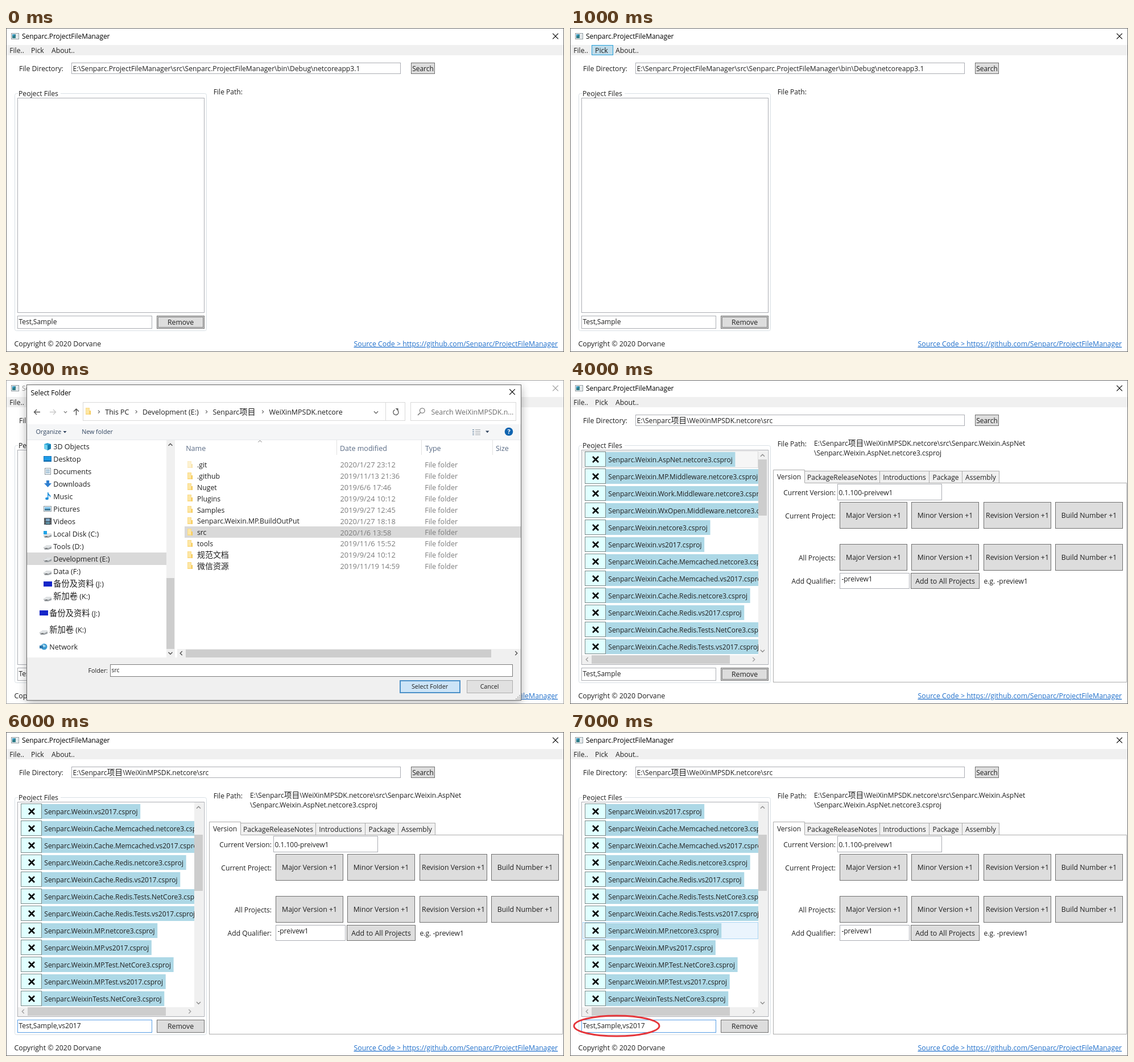
An HTML page that plays this animation: 981x571 px, repeating every 8000 ms.

```html
<!DOCTYPE html>
<html lang="en">
<head>
<meta charset="utf-8">
<title>File manager demo</title>
<style>
html, body { margin: 0; width: 100%; height: 100%; overflow: hidden; background: #fff; }
svg { display: block; width: 100vw; height: 100vh; font-family: "Open Sans", "Noto Sans CJK SC", "Noto Sans CJK", "Noto Sans", sans-serif; }
</style>
</head>
<body>
<svg id="stage" viewBox="0 0 981 571"></svg>
<script>
const stage = document.getElementById('stage');
const raw = String.raw;
const STEP = 1000, PHASES = 8;
const INK = '#1f1f1f', BOX = '#abadb3', BTN = '#ddd', EDGE = '#707070', BLUE = '#0078d7', SOFT_BLUE = '#3a94de';
const pen = document.createElement('canvas').getContext('2d');

// Helpers: text is centred on cy, boxes are given by their outer corners.
function text(x, cy, s, size = 12.1, fill = INK, anchor = 'start', extra = '') {
  const body = s.replace(/&/g, '&amp;').replace(/>/g, '&gt;')
    .replace(/[\u4e00-\u9fff]+/g, c => `<tspan font-size="${(size * 1.14).toFixed(2)}">${c}</tspan>`);
  return `<text x="${x}" y="${cy + size * 0.36}" font-size="${size}" fill="${fill}" text-anchor="${anchor}" ${extra}>${body}</text>`;
}
const fillBox = (x, y, x2, y2, fill) =>
  `<rect x="${x}" y="${y}" width="${x2 - x}" height="${y2 - y}" fill="${fill}"/>`;
const box = (x, y, x2, y2, fill = '#fff', line = BOX, w = 1, extra = '') =>
  `<rect x="${x + w / 2}" y="${y + w / 2}" width="${x2 - x - w}" height="${y2 - y - w}" fill="${fill}" stroke="${line}" stroke-width="${w}" ${extra}/>`;
const line = (d, color, w = 1, extra = '') =>
  `<path d="${d}" fill="none" stroke="${color}" stroke-width="${w}" ${extra}/>`;
const shape = (d, fill) => `<path d="${d}" fill="${fill}"/>`;
const cross = (x, y, r, color, w = 1) =>
  line(`M${x - r} ${y - r}l${2 * r} ${2 * r}m0 ${-2 * r}l${-2 * r} ${2 * r}`, color, w);

function chevron(x, y, dir, color = '#505050', r = 3.5, w = 1.4) {
  const turn = { up: 0, right: 90, down: 180, left: 270 }[dir];
  return line(`M${-r} ${r / 2}L0 ${-r / 2}L${r} ${r / 2}`, color, w, `transform="translate(${x} ${y}) rotate(${turn})"`);
}

function button(x, y, x2, y2, label, size = 12.3, focus = false) {
  let s = box(x, y, x2, y2, BTN, EDGE) + text((x + x2) / 2, (y + y2) / 2 + 0.5, label, size, INK, 'middle');
  if (focus) s += box(x + 2, y + 2, x2 - 2, y2 - 2, 'none', '#222', 1, 'stroke-dasharray="1 1"');
  return s;
}

// Main window
const PROJECTS = ['AspNet.netcore3', 'MP.Middleware.netcore3', 'Work.Middleware.netcore3',
  'WxOpen.Middleware.netcore3', 'netcore3', 'vs2017', 'Cache.Memcached.netcore3', 'Cache.Memcached.vs2017',
  'Cache.Redis.netcore3', 'Cache.Redis.vs2017', 'Cache.Redis.Tests.NetCore3', 'Cache.Redis.Tests.vs2017',
  'MP.netcore3', 'MP.vs2017', 'MP.Test.NetCore3', 'MP.Test.vs2017', 'Tests.NetCore3']
  .map(n => 'Senparc.Weixin' + (n.startsWith('Tests') ? '' : '.') + n + '.csproj');

function projectList(p) {
  const first = p >= 5 ? 5 : 0, hot = p === 5;
  let s = '<g clip-path="url(#rows)">';
  pen.font = '12px "Open Sans", "Noto Sans", sans-serif';
  PROJECTS.slice(first, first + 12).forEach((name, i) => {
    const y = 140 + i * 30;
    if (p === 4 && i === 0) s += box(22, y - 15, 331, y + 15, '#f6f6f6', '#dcdcdc');
    if (p === 7 && i === 7) s += box(22, y - 15, 331, y + 15, '#eaf4fd', '#a9d5f3');
    s += fillBox(63, y - 13, 72 + pen.measureText(name).width, y + 13, '#add8e6');
    s += box(26, y - 14, 63, y + 13, '#e0ffff', '#7c8a8a') + cross(45, y, 5, '#000', 2.6);
    s += text(67.3, y + 0.5, name, 12);
  });
  s += '</g>';
  const top = first ? 181 : 140, arrow = hot ? '#404040' : '#8c8c8c';
  s += fillBox(331, 124, 347, 501, '#f0f0f0') + fillBox(21, 485, 347, 501, '#f0f0f0');
  s += fillBox(331, top, 346, top + 99, hot ? '#a6a6a6' : '#cdcdcd') + fillBox(38, 485, 281, 500, '#cdcdcd');
  s += chevron(338.5, 133, 'up', arrow) + chevron(338.5, 477.5, 'down', arrow);
  return s + chevron(30, 492.5, 'left', '#a0a0a0') + chevron(323, 492.5, 'right', '#a0a0a0');
}

function details() {
  let s = text(429, 112, raw`E:\Senparc项目\WeiXinMPSDK.netcore\src\Senparc.Weixin.AspNet`, 12.07)
    + text(429, 129, raw`\Senparc.Weixin.AspNet.netcore3.csproj`, 12.07);
  s += box(357, 181, 979, 533, '#fff', '#acacac');
  const edges = [413, 545, 632, 690, 755];
  ['PackageReleaseNotes', 'Introductions', 'Package', 'Assembly'].forEach((t, i) => {
    s += box(edges[i] - 1, 160, edges[i + 1], 182, '#f0f0f0', '#acacac')
      + text((edges[i] + edges[i + 1]) / 2 - 0.5, 171.5, t, 12.1, INK, 'middle');
  });
  s += fillBox(357, 158, 413, 183, '#fff') + line('M357.5 183V158.5H412.5V181.5', '#acacac')
    + text(385, 171, 'Version', 12.1, INK, 'middle');
  [['Current Version:', 198.5], ['Current Project:', 240], ['All Projects:', 313.5], ['Add Qualifier:', 354.5]]
    .forEach(([t, y]) => s += text(467, y, t, 12.1, INK, 'end'));
  s += box(470, 183, 654, 212) + text(472.4, 198.5, '0.1.100-preivew1', 12);
  for (const y of [215, 289])
    ['Major Version', 'Minor Version', 'Revision Version', 'Build Number'].forEach((t, i) => {
      const x = Math.round(474 + i * 126.4);
      s += button(x, y, x + 119, y + 47, t + ' +1');
    });
  s += box(474, 340, 597, 368) + text(477.4, 350.5, '-preivew1', 12);
  return s + button(599, 340, 720, 368, 'Add to All Projects', 12.4) + text(727.4, 354.5, 'e.g. -preview1');
}

function mainWindow(p) {
  const away = p === 2 || p === 3, loaded = p > 3, typed = p > 5;
  const edge = away ? '#a0a0a0' : '#6b6b6b', dim = away ? '#999' : '#000';
  let s = box(0, 0, 981, 571, '#fff', edge);
  s += box(9, 9, 23, 20, '#f4f7f8', '#8d979c') + fillBox(11, 11, 17, 18, '#2c7a86')
    + fillBox(11, 11, 15, 14, '#3d9bc4') + fillBox(18, 11, 21, 18, '#dfe5e8');
  s += text(28, 15, 'Senparc.ProjectFileManager', 11.9, dim) + cross(966, 14.5, 4.8, dim, 1.1);
  s += fillBox(1, 30, 980, 48, '#f0f0f0');
  if (p === 1) s += box(38, 30, 76, 48, '#bfdcea', '#26a0da');
  s += text(6.3, 39.5, 'File..') + text(44, 39.5, 'Pick', 12.3) + text(80, 39.5, 'About..', 12.2);
  s += text(23, 71.5, 'File Directory:', 12.2) + box(115, 61, 694, 81);
  s += text(117.5, 71.5, loaded ? raw`E:\Senparc项目\WeiXinMPSDK.netcore\src`
    : raw`E:\Senparc.ProjectFileManager\src\Senparc.ProjectFileManager\bin\Debug\netcoreapp3.1`, 12.14);
  s += button(712, 61, 754, 81, 'Search', 12, p === 5);
  s += box(15, 115, 353, 534, '#fff', '#d9e0e5', 1, 'rx="3"') + fillBox(21, 112, 96, 119, '#fff') + text(22, 115.5, 'Peoject Files', 12.2);
  s += box(20, 123, 349, 502) + text(364.8, 112.5, 'File Path:');
  s += box(20, 507, 257, 530, '#fff', typed ? '#569de5' : BOX)
    + text(22.4, 517.5, typed ? 'Test,Sample,vs2017' : 'Test,Sample', 12);
  s += button(265, 507, 349, 530, 'Remove', 12.3, p < 5);
  s += text(14.4, 556.5, 'Copyright © 2020 Dorvane', 12.35)
    + text(611.5, 556.5, 'Source Code > https://github.com/Senparc/ProjectFileManager', 12.33, '#1f6fcb', 'start', 'text-decoration="underline"');
  if (loaded) s += projectList(p) + details();
  if (p === 7) s += '<ellipse cx="82" cy="518" rx="75" ry="18" fill="none" stroke="#e5353a" stroke-width="3"/>';
  return s;
}

// Folder dialog
const ROOT_DIRS = `EnergyBeanPlan|2018/5/7 22:08
NeuChar-v2|2019/5/20 15:57
NeuChar-WeiWeiHi|2019/5/27 15:13
NeuCharWeixinApiDoc|2019/5/19 16:55
QiNiu|2017/2/14 14:16
Senparc.BookHelper|2017/2/23 1:42
Senparc.CO2NET|2019/11/18 20:36
Senparc.Core|2018/5/5 15:29
Senparc.NeuChar|2019/6/1 22:56
Senparc.NugetServer|2017/2/14 14:16
Senparc.Optimization|2017/2/14 14:17
Senparc.ProjectFileManager|2020/1/30 15:29
Senparc.SDK|2017/8/14 18:04
Senparc.WebSocket|2017/3/15 15:28
Senparc.Weixin.Plugins|2018/2/10 23:21
Senparc.WeixinRobot|2019/12/10 17:14
SenparcCoreFramework|2019/4/6 14:40`;
const SDK_DIRS = `.git|2020/1/27 23:12
.github|2019/11/13 21:36
Nuget|2019/6/6 17:46
Plugins|2019/9/24 10:12
Samples|2019/9/27 12:45
Senparc.Weixin.MP.BuildOutPut|2020/1/27 18:18
src|2020/1/6 13:58
tools|2019/11/6 15:52
规范文档|2019/9/24 10:12
微信资源|2019/11/19 14:59`;

const folder = (x, y, faint) => `<g opacity="${faint ? 0.5 : 1}">`
  + shape(`M${x} ${y - 6}h7v5h2v7h-9z`, '#fbdb86') + shape(`M${x + 1} ${y - 5}h5v9h-5z`, '#fde7a6')
  + shape(`M${x + 7} ${y - 1}h2v7h-2z`, '#f5cb5c') + '</g>';
const drive = (x, y) => shape(`M${x} ${y + 2}l6 -4h7l1 3v3l-6 2h-6z`, '#9a9fa3')
  + shape(`M${x} ${y + 1.5}l6 -3.5h7l1 2.5l-6 3h-6z`, '#dfe2e4') + fillBox(x + 3, y + 3, x + 7, y + 4, '#555');

// Tree icons, drawn around (x, y) as the left middle.
const ICONS = {
  cube: (x, y) => shape(`M${x + 1} ${y - 4}l6 -2l6 2v8l-6 3l-6 -3z`, '#2ba3d6')
    + shape(`M${x + 1} ${y - 4}l6 2v9l-6 -3z`, '#6fd0ee') + shape(`M${x + 7} ${y - 2}l6 -2v8l-6 3z`, '#167db0'),
  desktop: (x, y) => box(x, y - 5, x + 14, y + 5, '#1d9be6', '#1877bd') + fillBox(x + 1, y + 3, x + 13, y + 4, '#0c5a93'),
  page: (x, y) => box(x + 2, y - 6, x + 13, y + 6, '#f7f9fa', '#8a979f') + line(`M${x + 4} ${y - 2.5}h7m-7 2.5h7m-7 2.5h7`, '#5b92b8'),
  down: (x, y) => shape(`M${x + 5} ${y - 6}h5v5h4l-6.5 7l-6.5 -7h4z`, '#2f7fd0'),
  music: (x, y) => shape(`M${x + 7} ${y - 7}h1.5q0 3 3.5 5q1 3 -1 4q.5 -3 -2.5 -4v6h-1.5z`, '#1e90dc')
    + `<ellipse cx="${x + 6}" cy="${y + 4}" rx="2.8" ry="2.2" fill="#1e90dc"/>`,
  picture: (x, y) => box(x, y - 5, x + 14, y + 5, '#e9f4fb', '#8b979e')
    + fillBox(x + 2, y - 3, x + 12, y, '#7fc3ea') + fillBox(x + 2, y, x + 12, y + 3, '#3f7896'),
  film: (x, y) => fillBox(x + 1, y - 6, x + 14, y + 6, '#343a40') + fillBox(x + 4, y - 5, x + 11, y, '#7fa8c8')
    + fillBox(x + 4, y + 1, x + 11, y + 5, '#5f8fa3') + line(`M${x + 2.5} ${y - 5}v11m10 -11v11`, '#ddd', 1, 'stroke-dasharray="1.5 1.5"'),
  system: (x, y) => drive(x, y + 1) + fillBox(x, y - 5, x + 6, y + 1, '#20a4e8'),
  drive,
  disk: (x, y) => fillBox(x, y - 5, x + 15, y + 4, '#1526c9'),
  flat: (x, y) => drive(x, y + 2),
  globe: (x, y) => `<circle cx="${x + 8}" cy="${y}" r="5.5" fill="#3e9bd2"/>`
    + shape(`M${x + 5} ${y - 4}q4 0 6 3q-3 3 -5 1z`, '#a8dcf2') + fillBox(x, y - 2, x + 6, y + 3, '#2f78ae')
};
const TREE = [['cube', '3D Objects'], ['desktop', 'Desktop'], ['page', 'Documents'], ['down', 'Downloads'],
  ['music', 'Music'], ['picture', 'Pictures'], ['film', 'Videos'], ['system', 'Local Disk (C:)'], ['drive', 'Tools (D:)'],
  ['drive', 'Development (E:)'], ['drive', 'Data (F:)'], ['disk', '备份及资料 (J:)'], ['flat', '新加卷 (K:)'],
  ['disk', '备份及资料 (J:)', 411], ['flat', '新加卷 (K:)', 440.5], ['globe', 'Network', 470]];

function tree() {
  let s = fillBox(37, 304, 282, 326, '#d9d9d9');
  TREE.forEach(([icon, label, low], i) => {
    const y = low || 117 + i * 22.05, x = low ? 59 : 66;
    s += ICONS[icon](x, Math.round(y)) + text(x + 17.3, y, label, 12.5);
  });
  s += fillBox(282, 106, 297, 489, '#f0f0f0') + fillBox(282, 349, 296, 474, '#cdcdcd');
  return s + chevron(289, 114, 'up') + chevron(289, 481.5, 'down');
}

function fileList(inside) {
  let s = '';
  [['Name', 316.2], ['Date modified', 587], ['Type', 737], ['Size', 861]]
    .forEach(([t, x]) => s += text(x, 120.5, t, 12.5, '#5a6b85'));
  s += line('M581.5 106V132M730.5 106V132M855.5 106V132', '#e2e2e2') + chevron(446.5, 108, 'up', '#777', 3, 1);
  (inside ? SDK_DIRS : ROOT_DIRS).split('\n').forEach((row, i) => {
    const [name, date] = row.split('|'), y = (inside ? 149.7 : 144) + i * 19.86;
    if (name === 'src') s += fillBox(314, 258, 905, 278, '#d9d9d9');
    s += folder(319, Math.round(y - 1), name === '.git') + text(336, y, name, 12.25)
      + text(587.5, y, date, 12.9, '#7c7c7c') + text(736.2, y, 'File folder', 12.55, '#7c7c7c');
  });
  const right = inside ? 905 : 890;
  s += fillBox(301, 474, right, 489, '#f0f0f0') + fillBox(316, 475, inside ? 853 : 825, 489, '#cdcdcd');
  s += chevron(308, 481.5, 'left') + chevron(right - 8, 481.5, 'right');
  if (!inside) s += fillBox(890, 106, 905, 474, '#f0f0f0') + fillBox(891, 137, 905, 278, '#cdcdcd')
    + chevron(897.5, 113.5, 'up') + chevron(897.5, 466, 'down');
  return s;
}

function addressBar(inside) {
  let s = line('M60 56.5H49.5M54 52l-4.5 4.5l4.5 4.5', '#555', 1.4) + line('M77 56.5H87.5M83 52l4.5 4.5l-4.5 4.5', '#c9c9c9', 1.4);
  s += chevron(104.5, 56.5, 'down', '#777', 2.6, 1.2) + line('M123.5 62V51M119 55.5l4.5 -4.5l4.5 4.5', '#555', 1.5);
  s += box(135, 39, 702, 72, '#fff', '#d9d9d9') + line('M667.5 40V71', '#d9d9d9') + folder(140, 55);
  const crumbs = [['This PC', 174.3], ['Development (E:)', 240], ['Senparc项目', 363.5]];
  if (inside) crumbs.push(['WeiXinMPSDK.netcore', 462.5]);
  crumbs.forEach(([t, x]) => s += chevron(x - 11, 56, 'right', '#666', 2.6, 1.1) + text(x, 56.5, t, 12.45));
  s += chevron(650.5, 57, 'down', '#666', 3.6, 1.3);
  s += line('M688.5 53.5a4.6 4.6 0 1 1 -5 -.8', '#555', 1.3) + shape('M684.5 50h5v4.5z', '#555');
  s += box(711, 39, 897, 72, '#fff', '#d9d9d9') + line('M724 62l4.5 -4.5', '#666', 1.2)
    + '<circle cx="731.8" cy="54" r="4.3" fill="none" stroke="#666" stroke-width="1.1"/>';
  return s + text(747.5, 56.5, inside ? 'Search WeiXinMPSDK.n...' : 'Search Senparc项目', 12.45, '#6d6d6d');
}

function toolBar() {
  const ink = '#30445f';
  let s = fillBox(37, 78, 905, 105, '#f5f6f7') + line('M37 105.5H905', '#e6e9ec');
  s += text(52.5, 91.5, 'Organize', 10.75, ink) + shape('M100.5 90h6l-3 3.5z', ink) + text(133.2, 91.5, 'New folder', 10.7, ink);
  s += line('M820 87.5h3m-3 3h3m-3 3h3m-3 3h3', '#5f7f9c') + line('M825 87.5h9m-9 3h9m-9 3h9m-9 3h9', '#a0a6ab');
  s += shape('M843 89.5h6.5l-3.25 3.7z', ink) + '<circle cx="884" cy="91" r="7.3" fill="#0f64b0"/>';
  return s + text(884, 91.3, '?', 11, '#fff', 'middle', 'font-weight="700"');
}

function dialog(inside) {
  let s = '<rect x="36" y="12" width="870" height="556" opacity=".3" filter="url(#blur)"/>';
  s += box(36, 8, 906, 565, '#fff', '#6a6a6a');
  s += text(43.5, 22.5, 'Select Folder', 11.9, '#000') + cross(890, 21, 4.8, '#000', 1.2);
  s += addressBar(inside) + toolBar() + tree() + fileList(inside);
  s += fillBox(37, 489, 905, 564, '#f0f0f0') + text(144.5, 512.5, 'Folder:', 10.7);
  s += box(183, 501, 891, 523, '#fff', inside ? '#7a7a7a' : SOFT_BLUE);
  s += inside ? text(185.5, 511.5, 'src', 10.4)
    : fillBox(185, 504, 249, 518, BLUE) + text(185.5, 511.5, 'Senparc项目', 10.6, '#fff') + line('M249.5 504V518', '#000');
  s += box(692, 529, 799, 552, inside ? '#cce4f7' : '#e1e1e1', inside ? '#4b90c8' : SOFT_BLUE, 2)
    + text(745, 540.5, 'Select Folder', 10.75, INK, 'middle');
  s += box(810, 529, 891, 552, '#e1e1e1', '#adadad') + text(850, 540.5, 'Cancel', 10.6, INK, 'middle');
  for (let i = 0; i < 3; i++)
    for (let j = 0; j <= i; j++) s += fillBox(902 - j * 3, 555 + i * 3, 904 - j * 3, 557 + i * 3, '#b5b5b5');
  return s;
}

const DEFS = `<defs><clipPath id="rows"><rect x="21" y="124" width="310" height="361"/></clipPath>
  <filter id="blur" x="-10%" y="-10%" width="120%" height="120%"><feGaussianBlur stdDeviation="8"/></filter></defs>`;
let shown = -1;
function render(ms) {
  const p = Math.floor(ms / STEP) % PHASES;
  if (p === shown) return;
  shown = p;
  stage.innerHTML = DEFS + mainWindow(p) + (p === 2 || p === 3 ? dialog(p === 3) : '');
}

const start = performance.now();
function tick(now) {
  render(Math.max(0, now - start));
  requestAnimationFrame(tick);
}
render(0);
requestAnimationFrame(tick);
</script>
</body>
</html>
```
